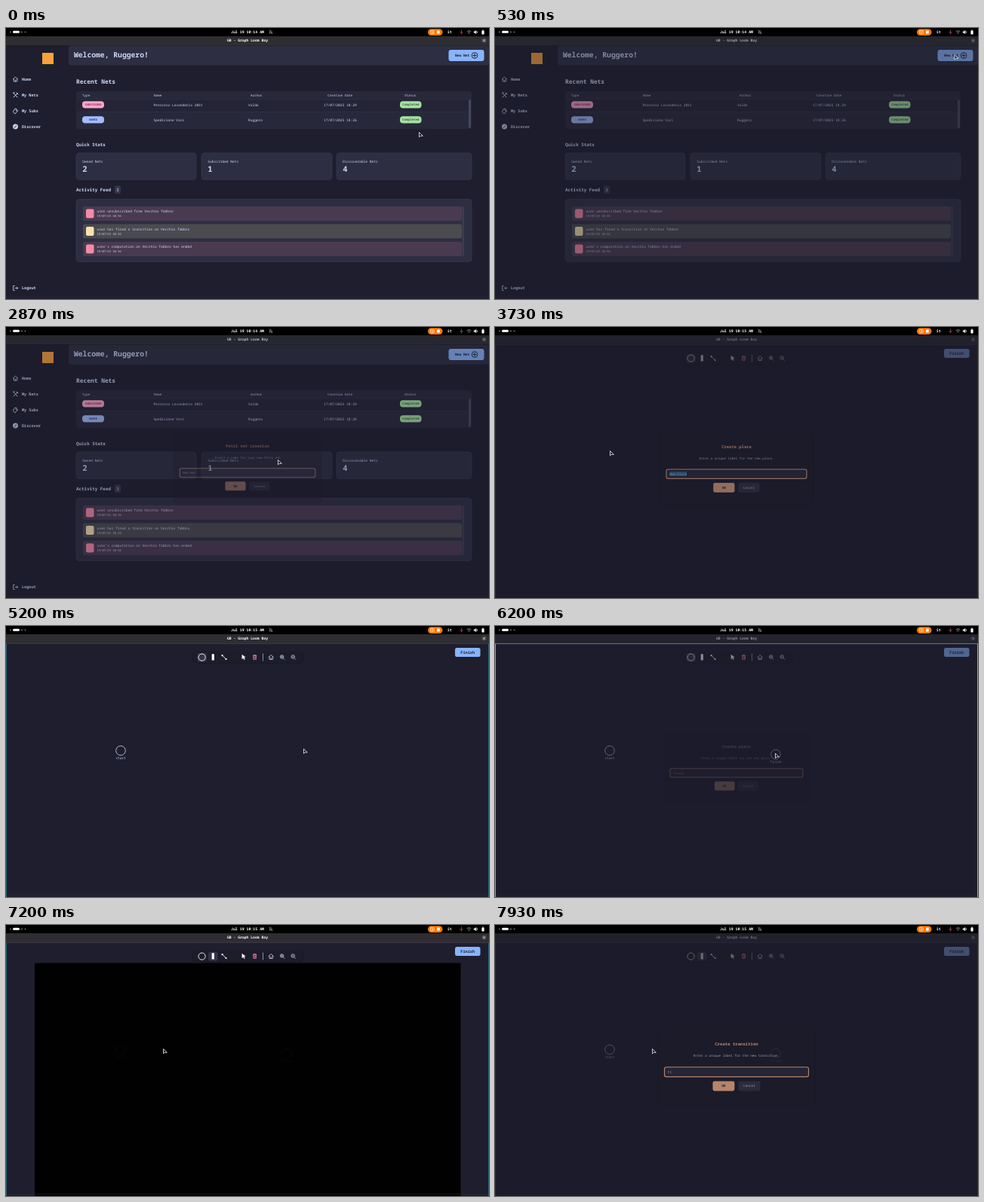
These frames come from a looping animation (640x360 px, 8000 ms). An HTML page:

```html
<!DOCTYPE html>
<html lang="en">
<head>
<meta charset="utf-8">
<title>Net editor</title>
<style>
  html, body { margin: 0; width: 100%; height: 100%; overflow: hidden; background: #000; }
  svg { display: block; width: 100vw; height: 100vh; }
  text { font-family: "Noto Sans Mono", "DejaVu Sans Mono", monospace; font-weight: 500;
         text-rendering: geometricPrecision; white-space: pre; }
  .b { font-weight: 700; }
  .m { text-anchor: middle; }
</style>
</head>
<body>
<svg id="stage" viewBox="0 0 640 360"></svg>
<script>
const LOOP = 8000, STEP = 200 / 3;
const BASE = '#1e1e2e', PANEL = '#2d2e42', LINE = '#45475a', FG = '#cdd6f4',
      BLUE = '#89b4fa', PINK = '#f38ba8', PEACH = '#fab387', GREEN = '#a6e3a1', SAND = '#f9e2af';

// y is the middle of the line of text
const text = (x, y, s, size, fill = FG, cls = '', id = '') =>
  `<text x="${x}" y="${y + size * 0.35}" font-size="${size}" fill="${fill}" class="${cls}" id="${id}">${s}</text>`;
const box = (x, y, w, h, fill, r = 0, more = '') =>
  `<rect x="${x}" y="${y}" width="${w}" height="${h}" rx="${r}" fill="${fill}" ${more}/>`;
const line = (d, stroke = FG, w = 0.8, fill = 'none') =>
  `<path d="${d}" fill="${fill}" stroke="${stroke}" stroke-width="${w}" stroke-linecap="round" stroke-linejoin="round"/>`;
const ring = (x, y, r, stroke = FG, w = 0.8, fill = 'none') =>
  `<circle cx="${x}" cy="${y}" r="${r}" fill="${fill}" stroke="${stroke}" stroke-width="${w}"/>`;
const dot = (x, y, r, fill) => `<circle cx="${x}" cy="${y}" r="${r}" fill="${fill}"/>`;
const group = (id, inner, more = '') => `<g id="${id}" ${more}>${inner}</g>`;

const house = (x, y) => line(`M${x - 3} ${y}L${x} ${y - 3}L${x + 3} ${y}M${x - 2.2} ${y - 0.6}V${y + 3}H${x + 2.2}V${y - 0.6}M${x} ${y + 3}V${y + 1}`);
const lens = (x, y, plus) => ring(x - 0.6, y - 0.6, 2.2) + line(`M${x + 1.2} ${y + 1.2}l1.8 1.8M${x - 1.6} ${y - 0.6}h2` + (plus ? `M${x - 0.6} ${y - 1.6}v2` : ''), FG, 0.7);

function systemBar() {
  return box(0, 0, 640, 11, '#000')
    + dot(6, 5.3, 0.9, '#888') + box(9, 3.8, 9, 3, '#fff', 1.5) + dot(21, 5.3, 0.9, '#888') + dot(25.5, 5.3, 0.9, '#888')
    + text(320, 5.3, '', 4.9, '#fff', 'b m', 'clock')
    + line('M349 6.8h3.6M349.6 6.6V4.6a1.4 1.4 0 0 1 2.6 0V6.6M348.8 2.8L353 7.8', '#aaa', 0.6)
    + box(559, 1.3, 19.5, 8.6, '#ff7800', 4.3) + box(562.5, 3.4, 4.6, 4.2, 'none', 0.8, 'stroke="#fff" stroke-width=".7"')
    + dot(564.8, 5.5, 0.8, '#fff') + box(571, 3.6, 3.8, 3.8, '#fff', 0.6)
    + text(584.8, 5.3, 'it', 4.9, '#fff', 'b')
    + line('M603.5 3v2.4M601.9 5.2a1.6 1.6 0 0 0 3.2 0M603.5 7v1', '#b0525c', 0.8)
    + line('M611 4.6a3.4 3.4 0 0 1 5 0M612.2 6a1.8 1.8 0 0 1 2.6 0M613.5 7.4v.1', '#aaa', 0.8)
    + line('M620.4 4.8h1l1.4-1.4v4.2l-1.4-1.4h-1zM624 4.2a2 2 0 0 1 0 2.6', '#fff', 0.6, '#fff')
    + box(630.4, 3.4, 3.2, 5, '#fff', 0.6) + box(631.2, 2.6, 1.6, 1, '#fff');
}

function titleBar() {
  return box(0, 11, 640, 12.5, '#2e2e32')
    + text(320, 16.6, 'GB - Graph Loom Bay', 4.75, '#fff', 'b m')
    + dot(633.5, 16.6, 3.3, '#47474b') + line('M632.4 15.5l2.2 2.2m0-2.2l-2.2 2.2', '#fff', 0.7);
}

function dashboard() {
  const menu = [['Home', 68], ['My Nets', 89], ['My Subs', 110], ['Discover', 131], ['Logout', 345.5]];
  const rows = [
    [102, 'SUBSCRIBED', '#f5a8c8', '#b0205c', 'Percorso Lavanderia 2031', 'Valdo', '17/07/2025 18:29'],
    [122, 'OWNED', '#a4bcf9', '#2746a8', 'Spedizione Vasi', 'Ruggero', '17/07/2025 18:26']];
  const cards = [[93, 159, 'Owned Nets', 2], [259, 173, 'Subscribed Nets', 1], [438, 179, 'Discoverable Nets', 4]];
  const feed = [
    [237, PINK, '#4a3a50', 'user unsubscribed from Vecchio fabbro'],
    [260.5, SAND, '#4b4a4f', 'user has fired a transition on Vecchio fabbro'],
    [284, PINK, '#4a3a50', "user's computation on Vecchio fabbro has ended"]];
  const head = [[101, 'Type'], [196, 'Name'], [324, 'Author'], [426, 'Creation Date'], [528, 'Status']];
  const edge = 'stroke="#3b3d52" stroke-width=".6"';

  return box(0, 23.5, 640, 336.5, BASE)
    + box(83, 23.5, 557, 26, PANEL, 3) + box(48, 33, 15, 15, '#f9a13c')
    + text(90, 36, 'Welcome, Ruggero!', 9.7, FG, 'b')
    + box(586.5, 29, 47, 15, BLUE, 3) + text(595, 36.5, 'New Net', 4.6, BASE, 'b')
    + ring(621, 36.5, 3.9, BASE, 0.9) + line('M618.8 36.5h4.4M621 34.3v4.4', BASE, 0.9)
    + menu.map(([s, y]) => text(21, y, s, 5.2, FG, 'b')).join('')
    + house(12.5, 68)
    + line('M10 92l5-5M10 86.5l5 5.5M14 86l2 2M9.6 86h1.6', FG, 1)
    + line('M9.6 111l2-3.6h2.4l-.6 2.4h2.4l-3.6 4z', FG, 0.9)
    + ring(12.5, 131, 3.2, FG, 0.6, FG) + line('M11.2 132.3l.8-1.8 1.8-.8-.8 1.8z', BASE, 0.5)
    + line('M11.5 342.5H9.6v6h1.9M12 345.5h3.6M14.2 344l1.5 1.5-1.5 1.5', FG, 0.8)
    + text(93, 71.5, 'Recent Nets', 7.9, FG, 'b')
    + box(93, 84, 524, 50, '#28283b', 4) + box(94, 95, 519, 16, '#242436')
    + line('M94 95H613M94 111.5H613', '#34354a', 0.5)
    + head.map(([x, s]) => text(x, 90, s, 4.25)).join('')
    + rows.map(([y, tag, bg, ink, name, who, date]) =>
        box(101, y - 4.7, 29, 9.2, bg, 4) + text(115.5, y, tag, 3.7, ink, 'b m')
        + text(195.5, y, name, 4.52) + text(321, y, who, 4.52) + text(421, y, date, 4.55)
        + box(522, y - 4.7, 28.5, 9.2, GREEN, 4) + text(536.2, y, 'Completed', 4.2, BASE, 'm')).join('')
    + box(613, 95, 3, 38, LINE, 1.5)
    + text(93, 154.5, 'Quick Stats', 5.9, FG, 'b')
    + cards.map(([x, w, s, n]) => box(x, 166, w, 35.5, PANEL, 4, edge)
        + text(x + 8.3, 177.5, s, 4.55) + text(x + 8.3, 187, n, 10.5, FG, 'b')).join('')
    + text(93, 214.5, 'Activity Feed', 5.9, FG, 'b')
    + box(144, 209.5, 8, 10.5, '#35364b', 2) + text(148, 214.7, '3', 5.6, FG, 'm')
    + box(93, 227.5, 524, 83, PANEL, 4, edge)
    + feed.map(([y, c, bg, s]) => box(102, y, 502, 19, bg, 2.5) + box(106, y + 3.5, 10.5, 12, c, 2)
        + text(120.5, y + 6.5, s, 4.55) + text(120.5, y + 12.8, '19/07/25 10:56', 3.85)).join('')
    + box(604.5, 237, 2.6, 66, '#3b3d50', 1.3)
    + line('M0 357.3H640', '#2a2a3c', 0.6);
}

function editor() {
  const place = (id, x, y) => group(id, ring(x, y, 6.3, FG, 0.8) + text(x, y + 10, id, 4.4, FG, 'm'));
  return box(0, 23.5, 640, 336.5, BASE)
    + place('start', 152, 165.5) + place('finish', 372, 170.5)
    + group('blank', box(38, 50.5, 564.5, 310, '#000', 0, 'opacity=".96"'))
    + box(246, 33, 149, 17, '#191925', 8) + box(247, 33, 147, 16, '#1c1c2a', 8)
    + box(253.5, 36, 12.4, 11.4, '#34354a', 2.5, 'id="tool"')
    + ring(259.6, 41.6, 4.6, '#fff', 0.9) + box(272.7, 37.2, 3.2, 8.4, '#fff', 0.4)
    + line('M286.5 39l5 5', '#fff', 0.9) + dot(286.6, 39.2, 1.1, '#fff') + dot(291.6, 44, 1.1, '#fff')
    + line('M313 38.4l4.2 3-2 .4 1.2 2.4-.9.4-1.1-2.4-1.4 1.4z', '#fff', 0.5, '#fff')
    + line('M327.2 39.4h4.8M328.8 39.2v-.9h1.6v.9M327.8 39.6v4.8h3.6v-4.8M329 41v2M330.3 41v2', PINK, 0.8)
    + line('M340.5 37v9', '#a6adc8', 0.8)
    + house(351.2, 41.4) + lens(366.2, 41.5, true) + lens(380.8, 41.5, false)
    + box(595, 29, 33.5, 12, BLUE, 2.5) + text(611.7, 35, 'Finish', 5.2, BASE, 'b m')
    + line('M0 357.3H640', '#2a2a3c', 0.6);
}

function dialog() {
  return box(210, 135, 220, 104, '#15151f', 5, 'opacity=".35"')
    + box(211.5, 135.5, 217, 102, '#1c1b2a', 4)
    + text(320, 154.5, '', 5.92, PEACH, 'b m', 'heading') + text(320, 171, '', 4.55, FG, 'm', 'hint')
    + box(220, 187, 200, 13.4, '#2a2a3d', 2.5, `stroke="${PEACH}" stroke-width="1.2"`)
    + box(224.5, 190.6, 0, 6.2, '#2f78a8', 0, 'id="mark"') + text(224.5, 193.7, '', 4.55, FG, '', 'value')
    + box(287, 206.5, 30.3, 13.6, PEACH, 2.5) + text(302.2, 213.3, 'OK', 4.6, BASE, 'b m')
    + box(322.5, 206.5, 30.5, 13.6, '#313244', 2.5) + text(337.7, 213.3, 'Cancel', 4.6, FG, 'm');
}

const stage = document.getElementById('stage');
stage.innerHTML = systemBar() + titleBar() + group('home', dashboard()) + group('canvas', editor())
  + box(0, 11, 640, 349, '#1b1a2a', 0, 'id="dim"')
  + group('frame', '<path id="sides" d="M.5 23.5V360M639.5 23.5V360" stroke-width="1"/><path id="top" d="M0 23.5H640" stroke-width=".8"/>')
  + group('dialog', dialog())
  + group('pointer', line('M0 0V5.9L1.7 4.4H4.4Z', '#fff', 0.75, '#15151c'));
const el = id => document.getElementById(id);

// each dialog: opening, closing, dim on, dim off, default value, typing times
const dialogs = [
  { open: 560, close: 2730, dimOn: 450, dimOff: 2800, dy: 0, title: 'Petri net creation',
    hint: 'Insert a name for your new Petri net', preset: 'New Net', word: 'New Net',
    keys: [1400, 1530, 1730, 2000, 2200, 2400, 2530] },
  { open: 3627, close: 4800, dimOn: 3520, dimOff: 4990, dy: 1.5, title: 'Create place',
    hint: 'Enter a unique label for the new place.', preset: 'New Place', word: 'start',
    keys: [4000, 4130, 4330, 4470, 4600] },
  { open: 5470, close: 6040, dimOn: 5390, dimOff: 6170, dy: 1.5, title: 'Create place',
    hint: 'Enter a unique label for the new place.', preset: 'New Place', word: 'finish',
    keys: [5670, 5730, 5800, 5870, 5930, 6000] },
  { open: 7270, close: 7873, dimOn: 7260, dimOff: 8060, dy: 1.5, title: 'Create transition',
    hint: 'Enter a unique label for the new transition.', preset: 'New Transition', word: 't1',
    keys: [7670, 7800] }];

const route = [
  [0, 547.5, 139], [60, 547.5, 139], [380, 609, 36], [660, 609, 36], [1200, 360.5, 177],
  [2900, 360.5, 177], [3200, 260, 41], [3270, 260, 41], [3500, 152.5, 165], [4870, 152.5, 165],
  [5200, 394.5, 163.5], [5330, 371.5, 169.5], [6270, 371.5, 169.5], [6630, 274, 41],
  [6730, 274, 41], [7130, 208.5, 165], [LOOP, 208.5, 165]];

const clamp = v => Math.max(0, Math.min(1, v));
const pulse = (t, on, up, off, down) => Math.min(clamp((t - on) / up), 1 - clamp((t - off) / down));
const show = (id, on) => el(id).setAttribute('visibility', on ? 'inherit' : 'hidden');

function pointerAt(t) {
  const i = Math.max(1, route.findIndex(p => p[0] > t));
  const a = route[i - 1], b = route[i];
  const u = clamp((t - a[0]) / (b[0] - a[0])), e = u * u * (3 - 2 * u);
  return [a[1] + (b[1] - a[1]) * e, a[2] + (b[2] - a[2]) * e];
}

function draw(t) {
  const editing = t > 2920;
  show('home', !editing);
  show('canvas', editing);
  show('frame', editing);
  el('clock').textContent = editing ? 'Jul 19 10:15 AM' : 'Jul 19 10:14 AM';
  if (editing) {
    show('start', t > 4790);
    show('finish', t > 6030);
    show('blank', t > 7190 && t < 7260);
    show('tool', t > 3250);
    el('tool').setAttribute('x', t > 6690 ? 268.1 : 253.5);
  }

  const dim = Math.max(...dialogs.map(d => pulse(t, d.dimOn, 130, d.dimOff, 130)));
  el('dim').setAttribute('opacity', 0.66 * dim);
  const flash = t > 6130 && t < 6260;
  el('sides').setAttribute('stroke', flash ? '#9a9aa8' : dim > 0.3 ? '#28283a' : '#2a6078');
  el('top').setAttribute('stroke', flash ? '#8a8a96' : dim > 0.3 ? '#28283a' : '#4a3a55');

  const d = dialogs.find(k => t >= k.open && t < k.close + 200);
  show('dialog', !!d);
  if (d) {
    const a = pulse(t, d.open, 200, d.close, 200);
    const typed = d.keys.filter(k => k <= t + 5).length;
    const value = typed ? d.word.slice(0, typed) : d.preset;
    el('dialog').setAttribute('opacity', a);
    el('dialog').setAttribute('transform',
      `translate(320 ${193.5 + d.dy}) scale(${0.85 + 0.15 * a}) translate(-320 -193.5)`);
    el('heading').textContent = d.title;
    el('hint').textContent = d.hint;
    el('value').textContent = value;
    el('mark').setAttribute('width', typed ? 0 : value.length * 2.73);
  }
  el('pointer').setAttribute('transform', `translate(${pointerAt(t)})`);
}

const born = performance.now();
function tick() {
  const t = (performance.now() - born) % LOOP;
  draw(Math.floor(t / STEP + 0.1) * STEP);
  requestAnimationFrame(tick);
}
tick();
</script>
</body>
</html>
```
